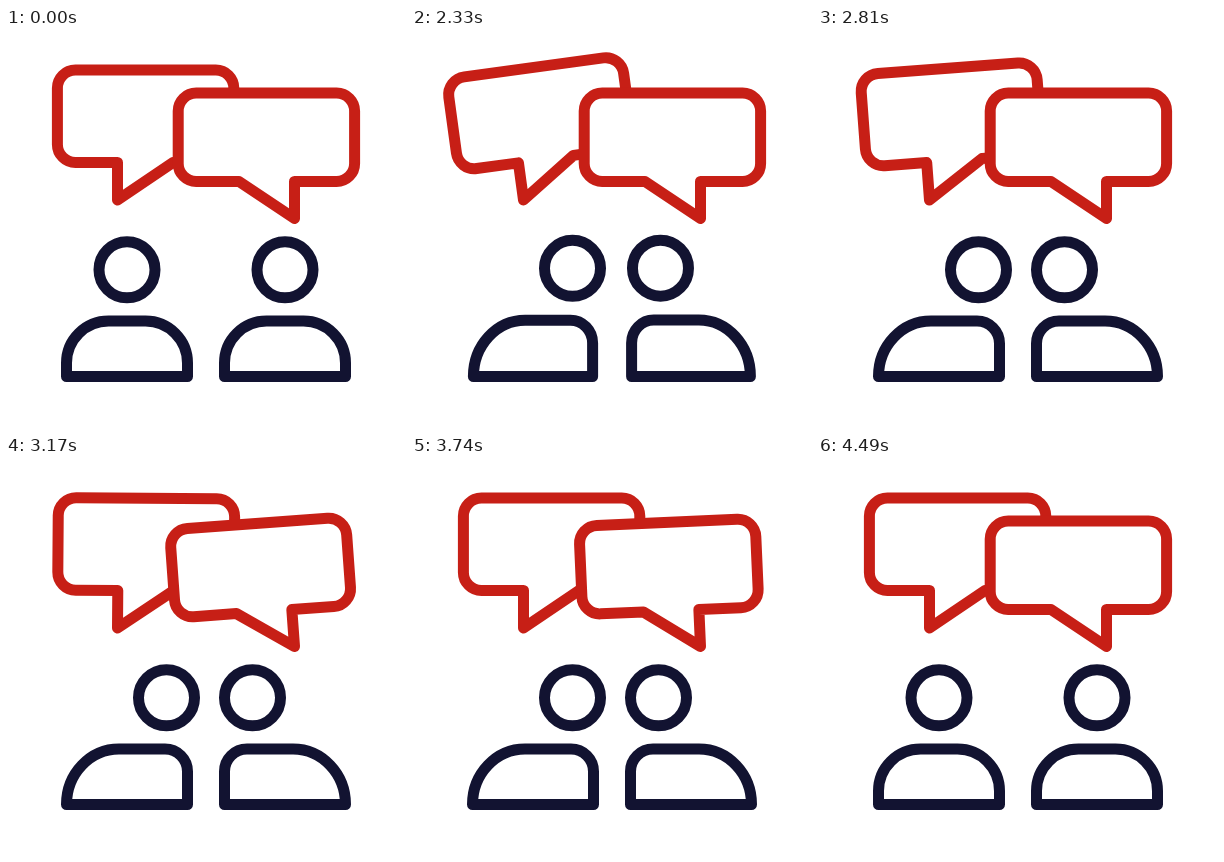
These frames come from a looping animation (400x400 px, 4.55 s). An HTML page with a canvas:

```html
<!DOCTYPE html>
<html lang="en">
<head>
<meta charset="utf-8">
<title>Conversation</title>
<style>
  html, body { margin: 0; width: 100%; height: 100%; overflow: hidden; background: #fff; }
  canvas { display: block; width: 400px; height: 400px; }
</style>
</head>
<body>
<canvas id="stage" width="400" height="400"></canvas>
<script>
const ctx = document.getElementById('stage').getContext('2d');
const LOOP = 4550, HOLD = 2030, STEP = 30, LAST = 4490;
const RED = '#c71f16', NAVY = '#121331';

// Keys are [time, value] pairs joined by smooth easing.
const SWING = [[-15, 0], [224, -20.5], [479, 13.5], [702, -8.8], [955, 2.8], [1240, 0]];
const SQUASH = [[0, 0], [110, 0.055], [270, -0.02], [450, 0]];
const DIP = [[0, 0], [130, 9.5], [270, -2], [450, 0]];
const NOD = [[0, 0], [150, 1], [300, 0]];

const people = [
  { flip: false, turn: 2000, back: 4040, nod: 3335, shift: 39.5 },
  { flip: true, turn: 2075, back: 3840, nod: 2490, shift: 32.5 }
];
const bubbles = [
  { flip: false, start: 2000, top: 42, bottom: 134.5, tip: 172 },
  { flip: true, start: 3116, top: 65, bottom: 153.5, tip: 190.5 }
];

function smooth(u) {
  u = Math.min(1, Math.max(0, u));
  return u * u * (3 - 2 * u);
}

function mix(a, b, u) {
  return a + (b - a) * u;
}

function track(keys, t) {
  if (t <= keys[0][0]) return keys[0][1];
  for (let i = 1; i < keys.length; i++) {
    const [t0, v0] = keys[i - 1], [t1, v1] = keys[i];
    if (t < t1) return mix(v0, v1, smooth((t - t0) / (t1 - t0)));
  }
  return keys[keys.length - 1][1];
}

function mirror(flip) {
  if (!flip) return;
  ctx.translate(400, 0);
  ctx.scale(-1, 1);
}

function drawBubble({ flip, start, top, bottom, tip }, t) {
  const left = 51.4, right = 227.8, r = 18, tail = 111.5;
  const angle = track(SWING, t - start) * Math.PI / 180;
  ctx.save();
  mirror(flip);
  ctx.translate(tail, tip);
  ctx.rotate(flip ? -angle : angle);
  ctx.translate(-tail, -tip);
  ctx.beginPath();
  ctx.moveTo(tail, bottom);
  ctx.arcTo(left, bottom, left, top, r);
  ctx.arcTo(left, top, right, top, r);
  ctx.arcTo(right, top, right, bottom, r);
  ctx.arcTo(right, bottom, left, bottom, r);
  ctx.lineTo(167, bottom);
  ctx.lineTo(tail, tip);
  ctx.closePath();
  ctx.fill();
  ctx.strokeStyle = RED;
  ctx.stroke();
  ctx.restore();
}

function drawBody(turned, squash) {
  const left = -60.5, right = 60.5, height = 55.5;
  const backX = mix(42, 52.5, turned), backY = mix(42, height, turned);
  const front = mix(42, 22.5, turned);
  ctx.save();
  ctx.translate(121, 348.5);
  ctx.scale(1 + squash, 1 - squash);
  ctx.beginPath();
  ctx.moveTo(left, 0);
  ctx.ellipse(left + backX, backY - height, backX, backY, 0, Math.PI, Math.PI * 1.5);
  ctx.ellipse(right - front, front - height, front, front, 0, -Math.PI / 2, 0);
  ctx.lineTo(right, 0);
  ctx.closePath();
  ctx.restore();
  ctx.stroke();
}

function drawPerson({ flip, turn, back, nod, shift }, t) {
  const progress = span => smooth((t - turn) / span) - smooth((t - back) / span);
  const both = keys => track(keys, t - turn) + track(keys, t - back);
  const bow = track(NOD, t - nod);
  ctx.save();
  mirror(flip);
  ctx.strokeStyle = NAVY;
  drawBody(progress(250), both(SQUASH));
  ctx.beginPath();
  ctx.arc(121 + shift * progress(300) + 3.3 * bow, 241.8 + both(DIP) + 10.5 * bow, 28, 0, Math.PI * 2);
  ctx.stroke();
  ctx.restore();
}

function draw(now) {
  const clock = now % LOOP;
  const t = clock < HOLD ? 0
    : Math.min(LAST, HOLD + Math.floor((clock - HOLD) / STEP) * STEP);
  ctx.fillStyle = '#fff';
  ctx.fillRect(0, 0, 400, 400);
  ctx.lineWidth = 11;
  ctx.lineJoin = ctx.lineCap = 'round';
  people.forEach(p => drawPerson(p, t >= LAST ? 0 : t));
  bubbles.forEach(b => drawBubble(b, t >= LAST ? 0 : t));
}

const began = performance.now();
function tick() {
  draw(performance.now() - began);
  requestAnimationFrame(tick);
}
tick();
</script>
</body>
</html>
```
